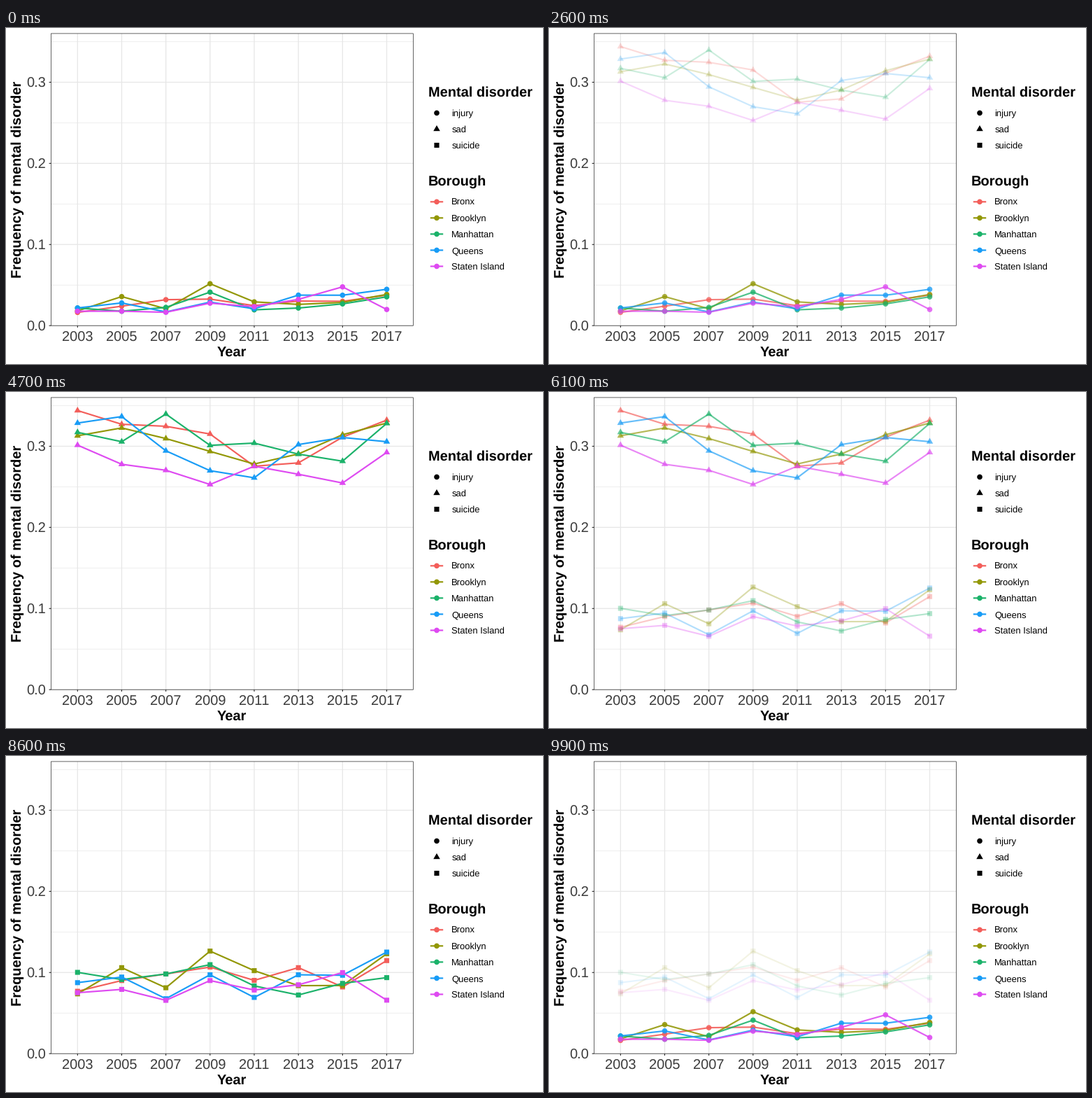
Write a matplotlib script that moves like this. It is 768 px wide and 480 px high and loops after 10000 ms.

```python
import numpy as np
import matplotlib.pyplot as plt
from matplotlib.animation import FuncAnimation
from matplotlib.collections import PolyCollection
from matplotlib.patches import Rectangle

plt.rcParams["font.family"] = "Liberation Sans"
plt.rcParams["text.hinting"] = "no_hinting"
plt.rcParams["text.hinting_factor"] = 1

W, H = 768, 480
PT = 0.75  # points per pixel at 96 dpi

LEFT, RIGHT, TOP, BOTTOM = 64.4, 582.4, 7.9, 425.2
UNIT = 1159.0  # pixels per 1.0 of frequency
STEP = (RIGHT - LEFT) / 8.2
YEARS = range(2003, 2018, 2)
XS = LEFT + STEP * (0.6 + np.arange(8))

BOROUGHS = ["Bronx", "Brooklyn", "Manhattan", "Queens", "Staten Island"]
COLORS = ["#f35e5a", "#929705", "#1bb26a", "#189cf6", "#de4af1"]
DISORDERS = ["injury", "sad", "suicide"]

# Frequencies in 1/10000, one row per borough
INJURY = [
    [163, 240, 320, 327, 247, 303, 300, 376],
    [182, 358, 208, 517, 293, 262, 286, 385],
    [217, 178, 225, 413, 195, 217, 268, 355],
    [218, 280, 169, 290, 208, 376, 375, 448],
    [178, 178, 165, 277, 234, 324, 478, 199],
]
SAD = [
    [3440, 3271, 3246, 3151, 2754, 2795, 3112, 3322],
    [3129, 3226, 3095, 2937, 2781, 2905, 3142, 3286],
    [3172, 3056, 3397, 3011, 3039, 2903, 2816, 3282],
    [3286, 3366, 2944, 2699, 2611, 3021, 3108, 3056],
    [3014, 2778, 2704, 2529, 2754, 2655, 2547, 2924],
]
SUICIDE = [
    [769, 901, 982, 1067, 903, 1060, 822, 1147],
    [737, 1060, 812, 1264, 1023, 838, 840, 1231],
    [1002, 913, 982, 1097, 835, 723, 866, 937],
    [875, 944, 677, 972, 693, 972, 966, 1252],
    [751, 792, 657, 901, 784, 849, 999, 659],
]

FRAMES, FADE = 100, 9
FADE_ENDS = (33, 67, 100)


def ngon(n, r):
    a = 2 * np.pi * np.arange(n) / n - np.pi / 2
    return r * np.column_stack([np.cos(a), np.sin(a)])


SHAPES = [ngon(48, 3.8), ngon(3, 5.5), 3.55 * np.array([[-1, -1], [1, -1], [1, 1], [-1, 1]])]

fig = plt.figure(figsize=(W / 96, H / 96), dpi=96, facecolor="white")
ax = fig.add_axes([0, 0, 1, 1])
ax.set_xlim(0, W)
ax.set_ylim(H, 0)
ax.axis("off")


def y_pos(freq):
    return BOTTOM - UNIT * np.asarray(freq)


def line(xs, ys, color, width, z):
    return ax.plot(xs, ys, color=color, lw=width * PT, zorder=z, snap=False,
                   solid_capstyle="butt", solid_joinstyle="round")[0]


def marks(shape, centers, colors, z=4):
    polys = [shape + c for c in centers]
    coll = PolyCollection(polys, facecolors=colors, edgecolors="none", zorder=z)
    coll.set_snap(False)
    return ax.add_collection(coll, autolim=False)


def label(x, y, text, size, color="black", **kw):
    ax.text(x, y, text, fontsize=size * PT, color=color, va="baseline", **kw)


def draw_panel():
    for freq in (0.05, 0.15, 0.25, 0.35):
        line([LEFT, RIGHT], [y_pos(freq)] * 2, "#e7e7e7", 0.7, 1)
    for freq in (0.0, 0.1, 0.2, 0.3):
        y = y_pos(freq)
        line([LEFT, RIGHT], [y, y], "#e7e7e7", 1.3, 1)
        line([LEFT - 2.8, LEFT], [y, y], "#242424", 1.1, 6)
        label(57.3, y + 7.6, f"{freq:.1f}", 20, "#3b3b3b", ha="right")
    for x, year in zip(XS, YEARS):
        line([x, x], [TOP, BOTTOM], "#e7e7e7", 1.3, 1)
        line([x, x], [BOTTOM, BOTTOM + 2.8], "#242424", 1.1, 6)
        label(x, 447.3, str(year), 20, "#3b3b3b", ha="center")
    ax.add_patch(Rectangle((LEFT, TOP), RIGHT - LEFT, BOTTOM - TOP, fill=False,
                           ec="#333333", lw=0.75 * PT, zorder=5, snap=False))
    label(323.3, 469.2, "Year", 20, weight="bold", ha="center")
    label(22, 216.5, "Frequency of mental disorder", 20, weight="bold",
          ha="center", rotation=90, rotation_mode="anchor")


def draw_legend():
    x = 616
    label(603.8, 98.2, "Mental disorder", 20, weight="bold")
    for i, (name, shape) in enumerate(zip(DISORDERS, SHAPES)):
        y = 121.4 + 23.04 * i
        marks(shape, [(x, y)], ["black"])
        label(637.2, y + 4.7, name, 13.2)
    label(603.8, 225.2, "Borough", 20, weight="bold")
    for i, (name, color) in enumerate(zip(BOROUGHS, COLORS)):
        y = 248.3 + 23.04 * i
        line([x - 9.2, x + 9.2], [y, y], color, 2.15, 3)
        marks(SHAPES[0], [(x, y)], [color])
        label(637.2, y + 4.7, name, 13.2)


def draw_state(rows, shape):
    ys = y_pos(np.array(rows) / 10000)
    parts = [line(XS, y, c, 2.15, 3) for y, c in zip(ys, COLORS)]
    centers = [(x, y) for row in ys for x, y in zip(XS, row)]
    parts.append(marks(shape, centers, np.repeat(COLORS, len(XS)).tolist()))
    return parts


def weights(n):
    """Opacity of each state: hold, then a linear cross-fade to the next."""
    w = [0.0, 0.0, 0.0]
    for i, end in enumerate(FADE_ENDS):
        if n < end:
            t = max(0.0, (n - end + FADE) / FADE)
            w[i], w[(i + 1) % 3] = 1 - t, t
            break
    return w


draw_panel()
draw_legend()
states = [draw_state(r, s) for r, s in zip((INJURY, SAD, SUICIDE), SHAPES)]


def update(n):
    for parts, alpha in zip(states, weights(n)):
        for part in parts:
            part.set_alpha(alpha)
            part.set_visible(alpha > 0)
    return [p for parts in states for p in parts]


update(0)
anim = FuncAnimation(fig, update, frames=FRAMES, interval=100, repeat=True,
                     repeat_delay=0, blit=False)
plt.show()
```
